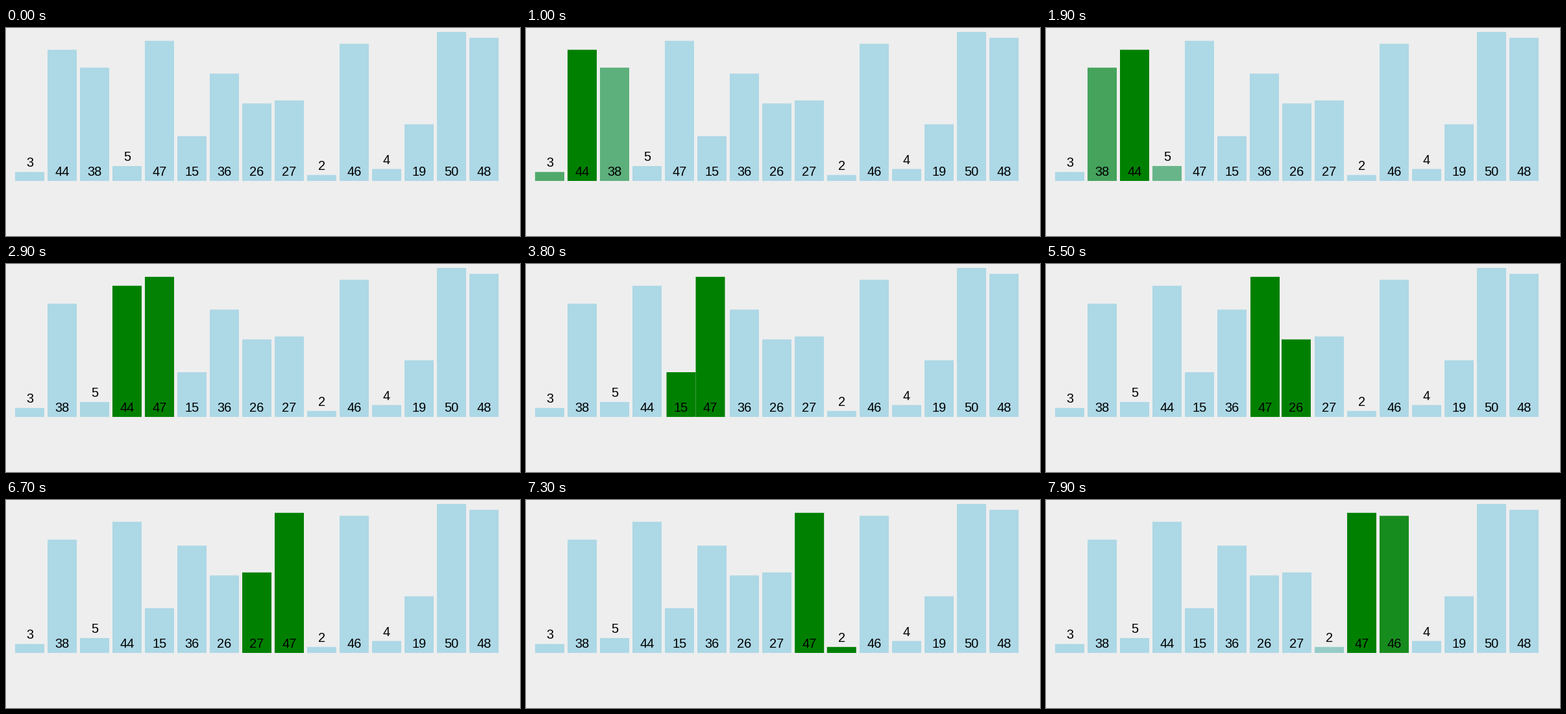
These frames come from a looping animation (792x321 px, 8000 ms). A matplotlib script:

```python
import matplotlib.pyplot as plt
import numpy as np
from matplotlib.animation import FuncAnimation
from matplotlib.colors import to_rgb
from matplotlib.patches import Rectangle

W, H, DPI = 792, 321, 100
STEP_MS, FRAMES = 100, 80
MOVE_MS = 250

VALUES = [3, 44, 38, 5, 47, 15, 36, 26, 27, 2, 46, 4, 19, 50, 48]
# Start of each compare or swap, in ms
STARTS = [395, 878, 1320, 1784, 2235, 2690, 3170, 3608, 4075,
          4522, 4990, 5457, 5916, 6375, 6825, 7275, 7730]

LEFT, PITCH, BAR_W = 14, 50, 45
BASE, UNIT = 236, 4.6
FONT_PX, DIGIT_W = 20, 0.556 * 20
IDLE = np.array(to_rgb("lightblue"))
ACTIVE = np.array(to_rgb("green"))


def ease(u):
    """Cubic in-out."""
    u = min(max(u, 0.0), 1.0)
    return 4 * u ** 3 if u < 0.5 else 1 - 4 * (1 - u) ** 3


def sort_state(t):
    """Slot position and highlight level of every bar at time t."""
    order = list(range(len(VALUES)))
    slot = np.arange(len(VALUES), dtype=float)
    glow = np.zeros(len(VALUES))
    i, swapping = 0, False
    for start in STARTS:
        if t < start:
            break
        p = ease((t - start) / MOVE_MS)
        a, b = order[i], order[i + 1]
        if swapping:
            slot[a], slot[b] = i + p, i + 1 - p
            order[i], order[i + 1] = b, a
            swapping = False
        else:
            glow[a] = max(glow[a], p)
            glow[b] = p
            if i > 0:
                glow[order[i - 1]] = 1 - p
            swapping = VALUES[a] > VALUES[b]
        if not swapping:
            i += 1
    return slot, glow


fig = plt.figure(figsize=(W / DPI, H / DPI), dpi=DPI, facecolor="#eeeeee")
ax = fig.add_axes([0, 0, 1, 1])
ax.set_xlim(0, W)
ax.set_ylim(H, 0)
ax.axis("off")

bars, labels = [], []
for k, v in enumerate(VALUES):
    top = BASE - v * UNIT
    bar = Rectangle((0, top), BAR_W, v * UNIT, linewidth=0, snap=False,
                    zorder=2 * k + 1)
    bars.append(ax.add_patch(bar))
    label_y = (top if v < 10 else BASE) - 8
    labels.append(ax.text(0, label_y, str(v), family="Liberation Sans",
                          fontsize=FONT_PX * 72 / DPI, color="black",
                          ha="left", va="baseline", zorder=2 * k + 2))


def draw(n):
    slot, glow = sort_state(n * STEP_MS)
    for bar, label, s, g in zip(bars, labels, slot, glow):
        x = LEFT + PITCH * s
        bar.set_x(x)
        bar.set_facecolor(IDLE + (ACTIVE - IDLE) * g)
        label.set_x(x + (BAR_W - DIGIT_W * len(label.get_text())) / 2)
    return bars + labels


anim = FuncAnimation(fig, draw, frames=FRAMES, interval=STEP_MS,
                     repeat=True, repeat_delay=0, blit=False)
plt.show()
```
